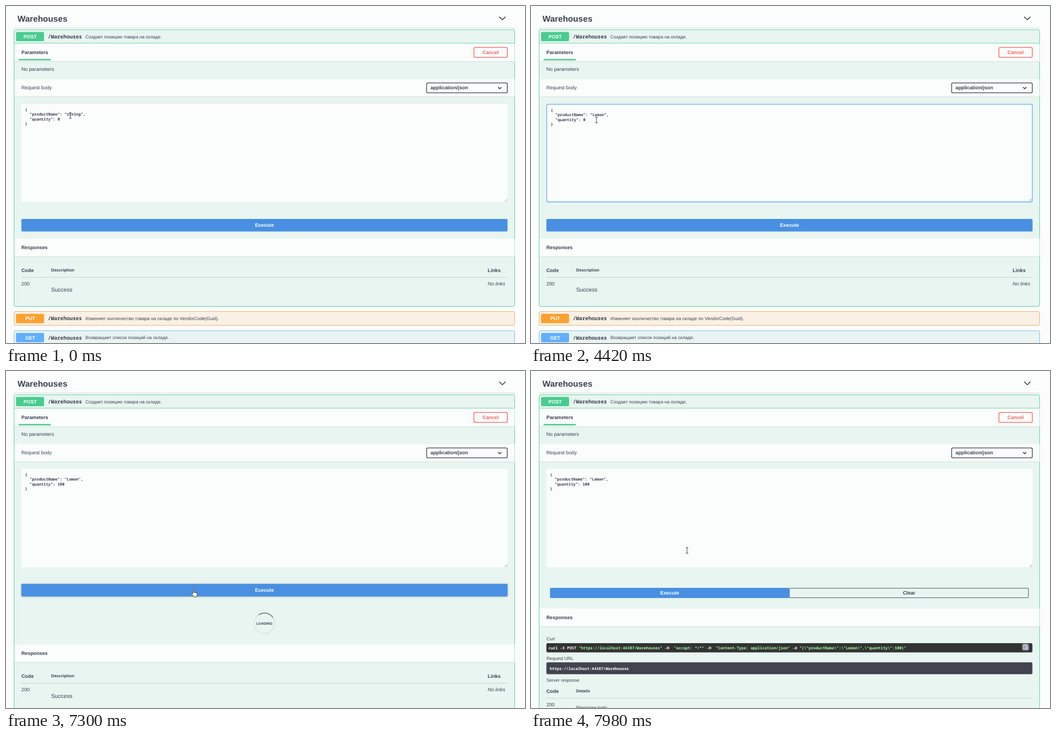
These frames come from a looping animation (928 by 603 pixels, 8000 ms). An HTML page:

```html
<!DOCTYPE html>
<html lang="ru">
<head>
<meta charset="utf-8">
<title>Warehouses API</title>
<style>
  html, body { margin: 0; width: 100%; height: 100%; overflow: hidden; background: #fbfdfc; }
  svg { display: block; width: 928px; height: 603px; }
  text {
    font: 8.82px "Liberation Sans", Arial, sans-serif;
    fill: #3b4151;
    white-space: pre;
    text-rendering: geometricPrecision;
  }
  .b { font-weight: bold; }
  .i { font-style: italic; }
  .mono { font-family: "Noto Sans Mono", "DejaVu Sans Mono", monospace; font-weight: bold; }
</style>
</head>
<body>
<svg id="stage" viewBox="0 0 928 603"></svg>
<script>
const LOOP = 8000;
const FOCUS = 90, SELECT = 250, BLUR = 7170, LOADING = 7270, RESPONSE = 7480;
const NAME_KEYS = [1360, 1790, 2070, 2290, 2540];
const DIGIT_KEYS = [5400, 5750, 6080];
const CLICK_QUANTITY = 3880, BACKSPACE = 4750;
const CODE_SIZE = 6.937, CHAR = CODE_SIZE * 0.6, LINE = 8.4;
const GREEN = '#49cc90', BLUE = '#4990e2', PAPER = '#fafdfc', INK = '#3b4151';

const rect = (x, y, w, h, fill, attrs = '') =>
  `<rect x="${x}" y="${y}" width="${w}" height="${h}" fill="${fill}" ${attrs}/>`;
const text = (x, y, str, cls = '', size = 8.82, style = '') =>
  `<text x="${x}" y="${y}" class="${cls}" style="font-size:${size}px;${style}">${str}</text>`;
const centered = (x, y, str, style = '', size = 8.82) =>
  text(x, y, str, 'b', size, 'text-anchor:middle;' + style);
const path = (d, stroke, width, attrs = 'fill="none"') =>
  `<path d="${d}" stroke="${stroke}" stroke-width="${width}" ${attrs}/>`;
const group = (x, y, body) => `<g transform="translate(${x} ${y})">${body}</g>`;
const clamp = v => Math.min(1, Math.max(0, v));
const smooth = u => u * u * (3 - 2 * u);
const countPast = (times, t) => times.filter(time => t >= time).length;

const section = (y, h) =>
  rect(15, y, 894.5, h, PAPER) + rect(15, y + h, 894.5, 1, '#d3dfda');
const rule = y => rect(27.5, y, 869.5, 1, '#c6d6d0');

function summary(y, method, color, description) {
  return rect(18, y + 4, 50, 16.6, color, 'rx="2"') +
    centered(43.2, y + 15.4, method, 'fill:#fff') +
    text(75, y + 15.6, '/Warehouses', 'mono', 9.23) +
    text(142, y + 15.2, description, '', 8.19);
}

function block(y, h, stroke, fill) {
  return rect(14.5, y, 895, h, fill, `rx="2.5" stroke="${stroke}"`);
}

function header() {
  return text(20.5, 28, 'Warehouses', 'b', 15.12) +
    path('M882 19.3l5.5 5.4 5.5-5.4', '#222', 1.3) +
    rect(14, 39, 896, 1, '#cddbd6');
}

function operationTop() {
  return summary(42.5, 'POST', GREEN, 'Создает позицию товара на складе.') +
    rect(15, 66, 894.5, 1, '#7ed5af') +
    section(67, 32) +
    text(27.5, 86.3, 'Parameters', 'b') +
    rect(22.5, 94.8, 57.5, 2.6, GREEN) +
    rect(836.6, 74.1, 59.8, 17.8, 'none', 'rx="2.5" stroke="#f9605c" stroke-width="1.3"') +
    centered(866.5, 86.3, 'Cancel', 'fill:#f9605c') +
    text(27.5, 116.3, 'No parameters') +
    section(131, 31) +
    text(27.5, 149.3, 'Request body') +
    rect(752.1, 137.6, 144.3, 17.8, PAPER, 'rx="2.5" stroke="#41444e" stroke-width="1.3"') +
    text(759, 149.3, 'application/json', 'b') +
    path('M879.8 145.2l3 3 3-3', '#222', 1.3);
}

function caret(t) {
  if (t >= SELECT && t < NAME_KEYS[0]) return '';
  const erased = t >= BACKSPACE;
  const stops = [
    [FOCUS, 1, 19],
    ...NAME_KEYS.map((time, i) => [time, 1, 19 + i]),
    [CLICK_QUANTITY, 2, erased ? 14 : 15],
    ...DIGIT_KEYS.map((time, i) => [time, 2, 15 + i])
  ];
  const [since, row, col] = stops.filter(stop => t >= stop[0]).pop();
  const visible = (t - since) % 1060 < 530;
  return visible ? rect(35.2 + col * CHAR, 181.4 + row * LINE, 0.8, 9.2, '#222') : '';
}

function editor(t) {
  const focused = t >= FOCUS && t < BLUR;
  const selected = t >= SELECT && t < NAME_KEYS[0];
  const x = focused ? 35.2 : 34, y = focused ? 188.9 : 187.7;
  const name = t < NAME_KEYS[0] ? 'string' : 'Lemon'.slice(0, countPast(NAME_KEYS, t));
  const quantity = t < BACKSPACE ? '0' : '100'.slice(0, countPast(DIGIT_KEYS, t));
  const word = selected ? `<tspan fill="#fff">${name}</tspan>` : name;
  const lines = ['{', `  "productName": "${word}",`, `  "quantity": ${quantity}`, '}'];
  return (focused
      ? rect(28.1, 175.9, 868.3, 174.6, PAPER, 'rx="2" stroke="#61affe" stroke-width="1.3"')
      : rect(27.5, 175, 869.5, 176, PAPER, 'rx="2"')) +
    path(focused ? 'M890 349l5-5M893 349l2-2' : 'M891.5 350.5l5-5M894.5 350.5l2-2', '#777', 0.7) +
    (selected ? rect(x + 18 * CHAR, 190, 6 * CHAR, 8.8, '#0078d7') : '') +
    lines.map((line, i) => text(x, y + i * LINE, line, 'mono', CODE_SIZE)).join('') +
    (focused ? caret(t) : '');
}

function executeButton(x, y, w, h, glow) {
  const shadow = glow ? `style="filter:drop-shadow(0 0 1.6px rgba(0,0,0,${0.35 * glow}))"` : '';
  return rect(x, y, w, h, BLUE, `rx="2" ${shadow}`) +
    centered(x + w / 2, y + h / 2 + 3.2, 'Execute', 'fill:#fff');
}

function spinner(t) {
  const angle = (t - LOADING) * 0.36;
  return group(462, 451.3,
    `<circle r="18.3" fill="none" stroke="#d5e2dc" stroke-width="1.3"/>` +
    `<g transform="rotate(${angle})">${path('M-12.9-12.9A18.3 18.3 0 0 1 12.9-12.9', '#5d6360', 1.3)}</g>` +
    centered(0, 2.3, 'LOADING', '', 6.3));
}

function documentedResponses() {
  return section(416, 32) +
    text(27.5, 435.3, 'Responses', 'b') +
    text(27.5, 475.8, 'Code', 'b') +
    text(80.7, 475.3, 'Description', 'b', 7.56) +
    text(861.3, 475.8, 'Links', 'b') +
    rule(485) +
    text(27.5, 500, '200') +
    text(80.7, 511.4, 'Success', '', 10.08) +
    text(861.3, 500, 'No links', 'i');
}

function curlCommand() {
  const quoted = str => `<tspan fill="#a2fca2">"${str}"</tspan>`;
  return 'curl -X POST ' + quoted('https://localhost:44387/Warehouses') +
    ' -H  ' + quoted('accept: */*') +
    ' -H  ' + quoted('Content-Type: application/json') +
    ' -d ' + quoted('{\\"productName\\":\\"Lemon\\",\\"quantity\\":100}');
}

function liveResponse() {
  const white = 'fill:#fff';
  return section(429, 32) +
    text(27.5, 447.9, 'Responses', 'b') +
    text(27.8, 486, 'Curl', '', 8) +
    rect(27.5, 491, 869, 16.5, '#333', 'rx="2.5"') +
    text(31.3, 501.6, curlCommand(), 'mono', CODE_SIZE, white) +
    rect(878, 491.8, 12.4, 12.4, '#7d8293', 'rx="2.5"') +
    path('M883 501.5h-2v-7h5.5v2M882.5 494h2.5M884 497h4v5h-4zM884.5 499.5h2.5', '#fff', 0.9) +
    text(27.8, 520.5, 'Request URL', '', 8) +
    rect(27.5, 525.2, 869, 21.4, '#41444e', 'rx="2.5"') +
    text(33.8, 538.8, 'https://localhost:44387/Warehouses', 'mono', CODE_SIZE, white) +
    text(27.8, 560, 'Server response', '', 8) +
    text(27.5, 580.1, 'Code', 'b') +
    text(80.7, 579.4, 'Details', 'b', 7.56) +
    rule(589) +
    text(27.5, 604, '200') +
    text(80.7, 609, 'Response body', '', 8);
}

function lowerPart(t) {
  const hover = clamp((t - 7050) / 200);
  if (t >= RESPONSE) {
    // The two buttons grow toward equal shares while their padding shrinks.
    const grow = smooth(clamp((t - RESPONSE - 15) / 300));
    const x = 34, total = 856, least = 87, h = 22 - 3.7 * grow;
    const w = least + (total - 2 * least) * grow / (1 + grow);
    return rect(x + w, 388.6, total - w - 0.6, h - 1.2, 'none', 'rx="2" stroke="#757b80" stroke-width="1.3"') +
      centered(x + (w + total) / 2, 388 + h / 2 + 2.8, 'Clear') +
      executeButton(x, 388, w, h, 1 - grow) +
      group(0, -4 * grow, liveResponse());
  }
  const loading = t >= LOADING;
  return executeButton(27.5, 381, 869.3, 22.5, hover) +
    (loading ? spinner(t) : '') +
    group(0, loading ? 73.2 : 0, documentedResponses());
}

function otherOperations() {
  return block(546.5, 25, '#efb873', '#faf0e5') +
    summary(546.8, 'PUT', '#fca130', 'Изменяет копличество товара на складе по VendorCode(Guid).'.replace('коплич', 'коллич')) +
    block(581, 25, '#84bdec', '#e9f4f2') +
    summary(581.1, 'GET', '#61affe', 'Возвращает список позиций на складе.');
}

// Each move: start, end, then a quadratic curve for the pointer's hot spot.
const MOVES = [
  [550, 710, [115, 196], [190, 207], [263, 201.5]],
  [3410, 3880, [263, 201.5], [185, 222], [117, 204]],
  [6590, 7080, [124, 204], [220, 215], [335.5, 391]],
  [7520, 7940, [335.5, 391], [318, 345], [279, 321]]
];

function pointer(t) {
  const [start, end, a, b, c] = MOVES.filter(move => t >= move[0]).pop() || MOVES[0];
  const p = smooth(clamp((t - start) / (end - start)));
  const [x, y] = a.map((v, i) => v * (1 - p) ** 2 + 2 * b[i] * p * (1 - p) + c[i] * p * p);
  const filled = 'fill="#fff" stroke-linejoin="round"';
  const shape = y < 351
    ? path('M-2.3-5H2.3M0-5V5M-2.3 5H2.3', '#333', 0.9)
    : y < (t < RESPONSE ? 381 : 388)
      ? path('M0 0V10.5l2.4-2.2 1.6 3.6 1.5-.7-1.6-3.5h3.3z', '#222', 0.7, filled)
      : path('M-1 7V.5a1 1 0 0 1 2 0V5l4.2.9a1.5 1.5 0 0 1 1.3 1.8L6 11.3 5.4 13H.5L-3 8.6c-.6-1 .6-1.9 1.3-1.2z', '#222', 0.8, filled);
  return group(x, y, shape);
}

function scene(t) {
  const expanded = t >= LOADING;
  return header() +
    (expanded ? '' : otherOperations()) +
    block(42.5, expanded ? 600 : 495, '#6ad2a4', '#e8f5f0') +
    operationTop() + editor(t) + lowerPart(t) + pointer(t);
}

const stage = document.getElementById('stage');
let shown = '';
function frame() {
  const markup = scene(performance.now() % LOOP);
  if (markup !== shown) stage.innerHTML = shown = markup;
  requestAnimationFrame(frame);
}
frame();
</script>
</body>
</html>
```
